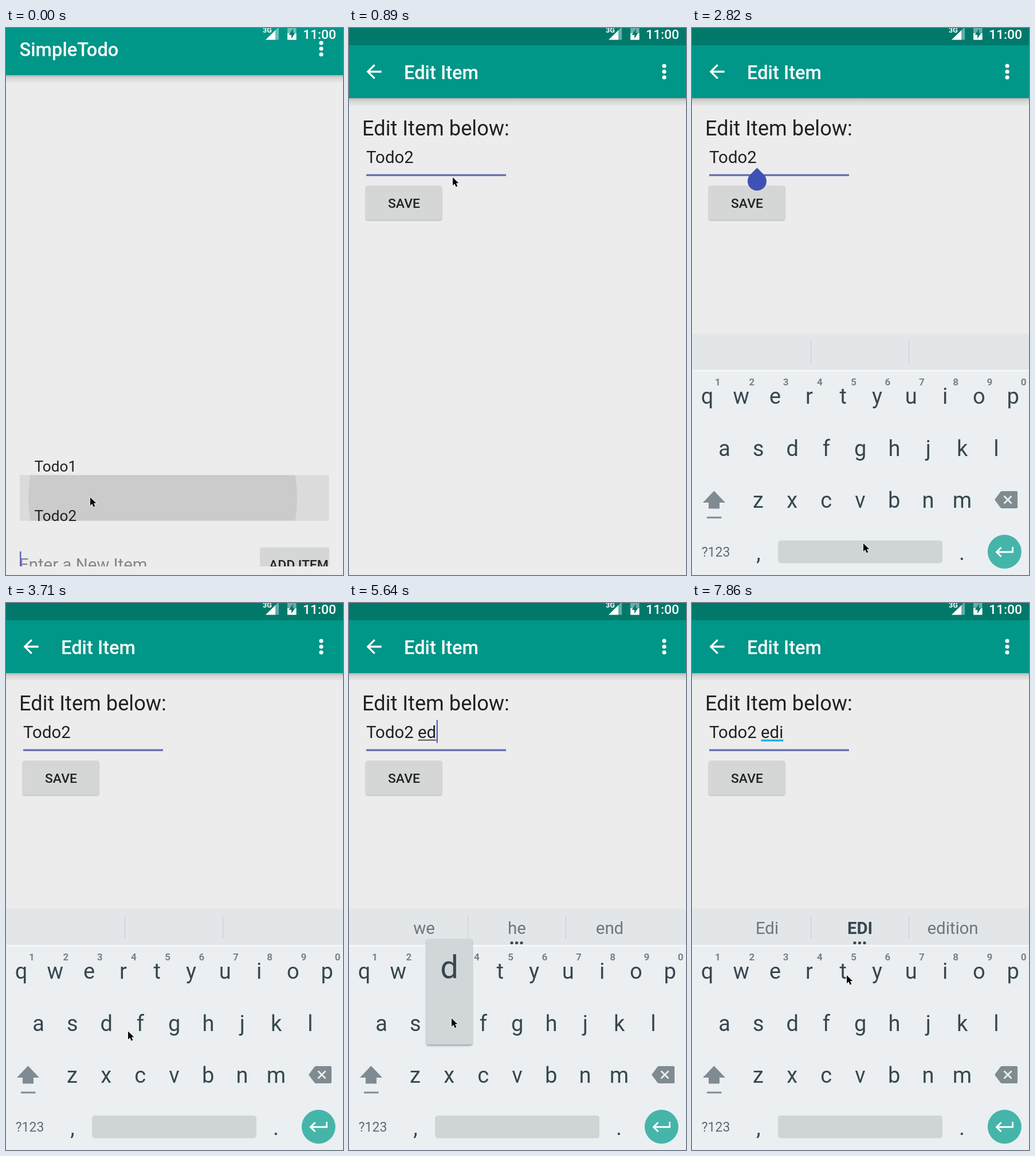
Write an HTML page that moves like this. It is 588 by 952 pixels and loops after 8 s.

```html
<!DOCTYPE html>
<html lang="en">
<head>
<meta charset="utf-8">
<title>Edit Item</title>
<style>
  html, body { margin: 0; width: 100%; height: 100%; overflow: hidden; background: #ececec; }
  svg { display: block; width: 588px; height: 952px; }
  text { font-family: Roboto, sans-serif; fill: #212121; white-space: pre; }
  .mid { text-anchor: middle; }
  .title { font-size: 32.67px; font-weight: 500; fill: #fff; }
  .field { font-size: 29.4px; }
  .item { font-size: 26.2px; }
  .btn { font-size: 22.87px; font-weight: 500; }
  .key { font-size: 38px; fill: #37474f; }
  .hint { font-size: 17px; font-weight: 700; fill: #76838a; }
  .word { font-size: 29.4px; fill: #6c777c; }
  .strong { font-weight: 700; fill: #37474f; }
  .raised { filter: drop-shadow(0 1px 1px rgba(0,0,0,.28)); }
  #popup { filter: drop-shadow(0 2px 1.5px rgba(0,0,0,.35)); }
</style>
</head>
<body>
<svg viewBox="0 0 588 952">
  <defs>
    <linearGradient id="fade" x2="0" y2="1">
      <stop offset="0" stop-opacity=".25"/>
      <stop offset=".35" stop-opacity=".1"/>
      <stop offset="1" stop-opacity=".02"/>
    </linearGradient>
    <clipPath id="window"><path d="M0 0H588V937H0Z"/></clipPath>
    <clipPath id="row"><path d="M24 778H563.5V857.5H24Z"/></clipPath>
    <g id="more" fill="#fff">
      <circle cx="550" cy="-10" r="3.6"/><circle cx="550" r="3.6"/><circle cx="550" cy="10" r="3.6"/>
    </g>
  </defs>
  <rect width="588" height="952" fill="#ececec"/>

  <g id="list" clip-path="url(#window)">
    <rect width="588" height="82" fill="#009688"/>
    <rect y="82" width="588" height="13" fill="url(#fade)"/>
    <text class="title" x="23.5" y="48.5">SimpleTodo</text>
    <use href="#more" y="36"/>
    <g clip-path="url(#row)">
      <rect id="press" x="24" y="778" width="540" height="80" fill="#dbdbdb"/>
      <circle id="ripple" cx="273.5" cy="818" r="234.5" fill="#cbcbcb"/>
    </g>
    <text class="item" x="49.5" y="772">Todo1</text>
    <text class="item" x="49.5" y="857.5">Todo2</text>
    <text class="field" x="23" y="944" style="fill:#868686">Enter a New Item</text>
    <rect x="24" y="911" width="2.5" height="30" fill="#5b68c0"/>
    <path d="M564 904H447q-4 0-4 4V940H564Z" fill="#d5d6d6"/>
    <text class="btn" x="459" y="942">ADD ITEM</text>
  </g>

  <g id="edit">
    <rect width="588" height="952" fill="#ececec"/>
    <rect y="122" width="588" height="13" fill="url(#fade)"/>
    <rect width="588" height="122" fill="#009688"/>
    <rect width="588" height="30" fill="#00796b"/>
    <path transform="translate(24 56.4) scale(1.633)" fill="#fff"
      d="M20 11H7.83l5.59-5.59L12 4l-8 8 8 8 1.41-1.41L7.83 13H20z"/>
    <text class="title" x="96" y="88.5">Edit Item</text>
    <use href="#more" y="76"/>
    <text x="23" y="187" font-size="36.2">Edit Item below:</text>
    <text id="value" class="field" x="30" y="235"></text>
    <rect id="under" x="120.5"/>
    <rect id="caret" y="203.5" width="2.4" height="40" fill="#5b68c0"/>
    <rect x="30" y="254.5" width="244" height="3.5" fill="#8d95cd"/>
    <rect x="30" y="254.8" width="244" height="2" fill="#5a62aa"/>
    <rect class="raised" x="29.5" y="274.5" width="132.5" height="59.5" rx="3.5" fill="#d5d7d6"/>
    <text class="btn mid" x="96" y="313">SAVE</text>
    <path id="handle" d="M113.5 243.2L125.2 254.9A16.5 16.5 0 1 1 101.8 254.9Z" fill="#3f51b5"/>
  </g>

  <g id="status" fill="#fff">
    <text x="448" y="8" font-size="12.5" font-weight="700" style="fill:#fff">3G</text>
    <path d="M476-2V20.500H453Z" opacity=".4"/>
    <path d="M470 4V20.500H453Z"/>
    <path d="M491-2H506.500V20.500H491Z" opacity=".4"/>
    <path d="M491 9H506.500V20.500H491Z"/>
    <path d="M501 1L493.500 12H498V18.500L504.500 8.500H500.500Z" fill="#00796b"/>
    <text class="btn" x="518" y="18.500" style="fill:#fff">11:00</text>
  </g>

  <g id="board">
    <rect y="532" width="588" height="420" fill="#ebeff2"/>
    <rect y="532" width="588" height="63" fill="#e2e6e9"/>
    <rect y="595" width="588" height="2.5" fill="#f6f8f9"/>
    <path d="M207.500 544V584M378.500 544V584" stroke="#ccd1d4" stroke-width="1.300"/>
    <g id="words">
      <text class="word mid" x="131" y="576"></text>
      <text class="word mid" x="293" y="576"></text>
      <text class="word mid" x="455" y="576"></text>
      <g fill="#37474f">
        <circle cx="284" cy="591.500" r="2.600"/><circle cx="292.500" cy="591.500" r="2.600"/><circle cx="301" cy="591.500" r="2.600"/>
      </g>
    </g>
    <g id="keys"></g>
    <g fill="#7f8b91">
      <path d="M38.500 805.500L58 826H48V836.500H29V826H19Z"/>
      <rect x="26" y="850.500" width="25.500" height="3"/>
      <path d="M528 821L538 807.500Q539.500 806 541 806H566Q568 806 568 808V834Q568 836 566 836H541Q539.500 836 538 834.500Z"/>
    </g>
    <path d="M544.500 814.500L557.500 827.500M557.500 814.500L544.500 827.500" stroke="#ebeff2" stroke-width="2.800"/>
    <text class="mid" x="41.500" y="920" font-size="23" style="fill:#5f6b71">?123</text>
    <rect x="150" y="892" width="287" height="39.500" rx="5" fill="#cfd4d7"/>
    <circle cx="545.300" cy="911.500" r="29.500" fill="#45b5aa"/>
    <path d="M559.500 903V912H532M539.500 904L531.500 912L539.500 920" fill="none" stroke="#fff" stroke-width="3"/>
  </g>

  <g id="popup">
    <rect x="-40" width="80" rx="4" fill="#d1d6d9"/>
    <text class="mid" y="68" font-size="56" style="fill:#37474f"></text>
    <g fill="#98a2a7">
      <circle cx="19" cy="89" r="2.400"/><circle cx="26.500" cy="89" r="2.400"/><circle cx="34" cy="89" r="2.400"/>
    </g>
  </g>

  <path id="mouse" d="M0 0V14L3.300 11L5.700 16.500L8.300 15.300L5.900 10H10.300Z" stroke="#fff" stroke-width="1.200" paint-order="stroke"/>
</svg>
<script>
const LOOP = 8000, STEP = 148.4;
const $ = id => document.getElementById(id);
const show = (el, on) => { el.style.display = on ? '' : 'none'; };
const set = (el, attrs) => { for (const k in attrs) el.setAttribute(k, attrs[k]); };

function addText(cls, x, y, str) {
  const el = document.createElementNS('http://www.w3.org/2000/svg', 'text');
  set(el, { class: cls + ' mid', x, y });
  el.textContent = str;
  $('keys').append(el);
}
const PITCH = 59.3;
[['qwertyuiop', 26.5, 654], ['asdfghjkl', 56.5, 745], ['zxcvbnm', 115.5, 835]].forEach(([row, x, y]) =>
  [...row].forEach((c, i) => addText('key', x + i * PITCH, y, c)));
[...'1234567890'].forEach((c, i) => addText('hint', 45 + i * PITCH, 622, c));
addText('key', 116, 925.5, ',');
addText('key', 471, 925.5, '.');

// Pointer stops: tick, x, y
const path = [
  [0, 147, 817], [2, 147, 817], [4, 158, 640], [6, 181, 260], [8, 178, 232], [15, 178, 232],
  [17, 268, 610], [18, 306, 860], [19, 299, 897], [21, 299, 897], [24, 238, 780], [28, 138, 642],
  [31, 138, 642], [34, 160, 686], [36, 172, 708], [38, 179, 723], [39, 185, 718], [41, 320, 630],
  [42, 320, 630], [45, 411, 623], [47, 434, 635], [49, 434, 635], [50, 428, 637], [53, 270, 648]
];
// Values that hold until the next entry: tick, value
const values = [[0, 'Todo2'], [21, 'Todo2 '], [30, 'Todo2 e'], [38, 'Todo2 ed'], [49, 'Todo2 edi']];
const suggestions = [[0, ''], [31, 'we he end'], [39, 'we end education'], [50, 'Edi EDI edition']];
const popups = [[0, ''], [30, 'e'], [32, ''], [37, 'd'], [39, ''], [49, 'i'], [51, '']];
const caretOn = [[0, 0], [9, 1], [13, 0], [15, 1], [19, 0], [21, 1], [25, 0], [30, 1], [34, 0], [36, 1], [43, 0], [46, 1], [52, 0]];
const spots = { e: [145.5, 489.5, 188], d: [175, 584.5, 184], i: [441.5, 489.5, 188] };

const at = (track, n) => track.findLast(e => e[0] <= n)[1];

function pointer(n) {
  const i = path.findLastIndex(p => p[0] <= n), a = path[i], b = path[i + 1] || a;
  const k = b === a ? 0 : (n - a[0]) / (b[0] - a[0]);
  return [a[1] + (b[1] - a[1]) * k, a[2] + (b[2] - a[2]) * k];
}

function slide(el, dy, alpha) {
  show(el, alpha > 0);
  set(el, { transform: `translate(0 ${dy})`, opacity: alpha });
}

function draw(n) {
  set($('ripple'), { r: 234.5 + n * 60, opacity: n < 2 ? 1 : 0.5 });
  if (n < 3) slide($('edit'), 0, 0);
  else slide($('edit'), n < 4 ? 26 : 0, n < 4 ? 0.75 : 1);
  if (n < 10) slide($('board'), 0, 0);
  else slide($('board'), n < 11 ? 60 : 0, n < 11 ? 0.7 : 1);

  const value = $('value'), under = $('under');
  value.textContent = at(values, n);
  const end = 30 + value.getComputedTextLength();
  set($('caret'), { x: end + 0.4 });
  show($('caret'), at(caretOn, n));
  show($('handle'), n >= 9 && n < 21);
  const fix = n >= 39;
  show(under, n >= 30);
  set(under, { y: fix ? 237.5 : 237.8, width: Math.max(0, end - 120.5), height: fix ? 3.5 : 1.6, fill: fix ? '#29b0ee' : '#333' });

  const words = at(suggestions, n).split(' ');
  show($('words'), words.length === 3);
  $('words').querySelectorAll('text').forEach((el, i) => {
    el.textContent = words[i] || '';
    el.classList.toggle('strong', fix && i === 1);
  });

  const letter = at(popups, n), popup = $('popup');
  show(popup, letter);
  if (letter) {
    const [x, y, h] = spots[letter];
    set(popup, { transform: `translate(${x} ${y})` });
    set(popup.children[0], { height: h });
    popup.children[1].textContent = letter;
    show(popup.children[2], letter !== 'd');
  }
  set($('mouse'), { transform: `translate(${pointer(n)})` });
}

const start = performance.now();
let last = -1;
function tick() {
  const t = (performance.now() - start) % LOOP;
  const n = Math.min(53, Math.floor((t + 8) / STEP));
  if (n !== last) draw(last = n);
  requestAnimationFrame(tick);
}
tick();
</script>
</body>
</html>
```
